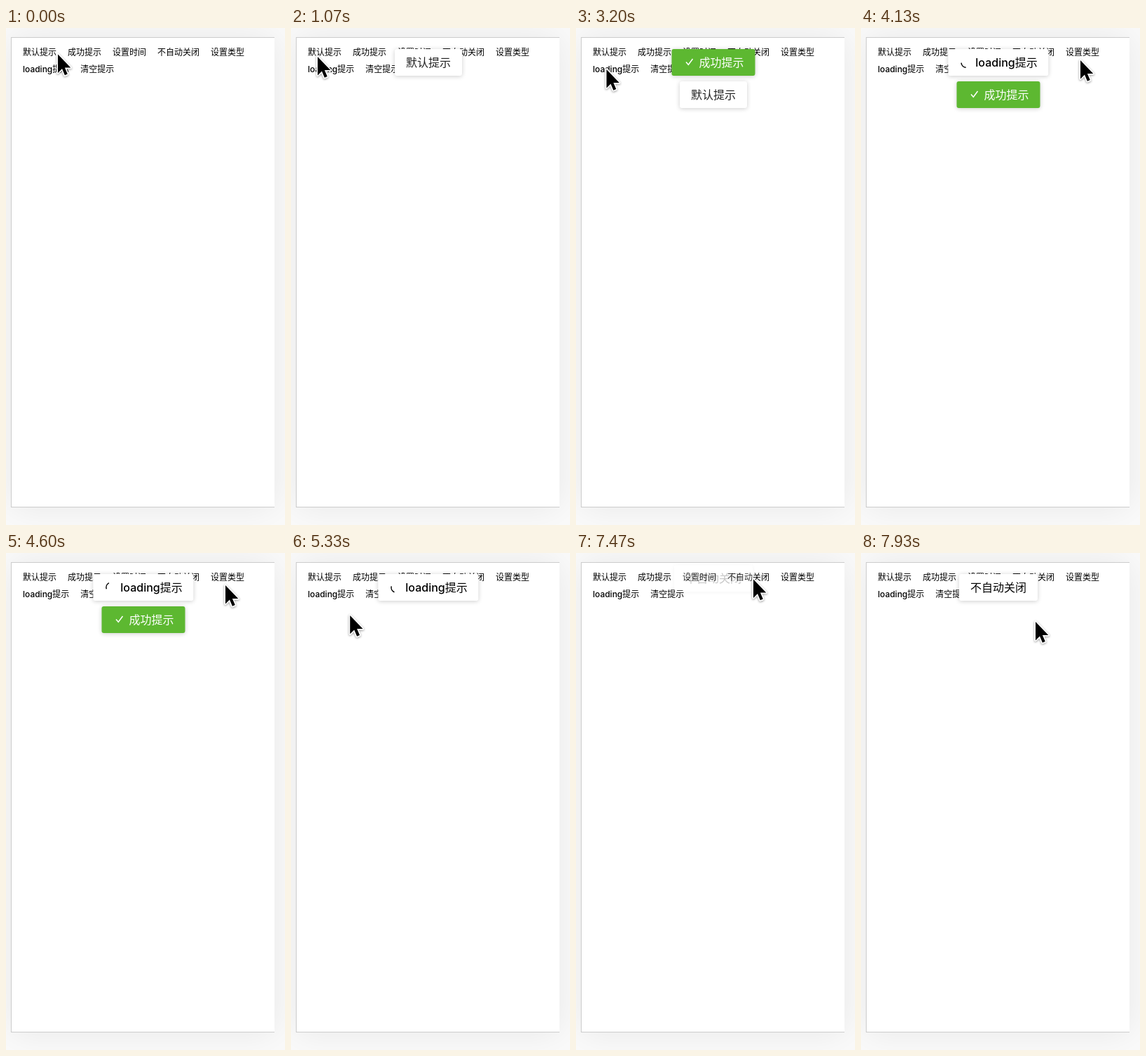
Animation, 398 px wide and 708 px high, one loop 8000 ms. Source, as an HTML page:

```html
<!DOCTYPE html>
<html lang="zh-CN">
<head>
<meta charset="utf-8">
<title>提示</title>
<style>
  html, body { margin: 0; width: 100%; height: 100%; overflow: hidden; }
  body {
    position: relative;
    background: #fafafa;
    color: #000;
    font: 500 12px/24px Inter, "Noto Sans CJK SC", "Noto Sans CJK", sans-serif;
    white-space: nowrap;
  }
  .panel {
    position: absolute;
    left: 7px; top: 13px; width: 376px; height: 670px;
    box-sizing: border-box;
    padding: 9px 16px;
    display: flex;
    flex-wrap: wrap;
    align-content: flex-start;
    column-gap: 16px;
    border: 1px solid #ccc;
    border-right: 0;
    background: #fff;
    box-shadow: 0 0 48px rgba(0, 0, 0, .08);
  }
  .toast {
    position: absolute;
    left: 196px; top: 0;
    display: flex;
    align-items: center;
    height: 38px;
    padding: 0 16px;
    border-radius: 3px;
    background: #fff;
    box-shadow: 0 1px 6px rgba(0, 0, 0, .2);
    font-size: 16px;
  }
  .toast svg {
    margin: 0 5px 0 2px;
    overflow: visible;
    fill: none;
    stroke: currentColor;
    stroke-width: 1.5;
  }
  .success { background: #5db831; color: #fff; }
  .plain { color: #222; }
  #cursor {
    position: absolute;
    left: 0; top: 0;
    overflow: visible;
    filter: drop-shadow(0 1px 1.5px rgba(0, 0, 0, .4));
  }
</style>
</head>
<body>
<div class="panel">
  <span>默认提示</span><span>成功提示</span><span>设置时间</span><span>不自动关闭</span>
  <span>设置类型</span><span>loading提示</span><span>清空提示</span>
</div>
<div class="toast plain">默认提示</div>
<div class="toast success">
  <svg width="16" height="16"><path d="M2.5 7.5L5.8 11.2L12 3"/></svg>成功提示
</div>
<div class="toast">
  <svg id="spinner" width="16" height="16"><path d="M13.6 3.3A7.3 7.3 0 0 1 13.6 12.7"/></svg>loading提示
</div>
<div class="toast">不自动关闭</div>
<svg id="cursor" width="20" height="32">
  <path d="M0 0V26.4L6 20.6L9.9 29.8L13.8 28.1L9.9 19.1H18.3Z"
        stroke="#fff" stroke-width="3.4" stroke-linejoin="round" paint-order="stroke"/>
</svg>
<script>
const LOOP = 8000, TICK = 1000 / 15;
const LIFE = 2920, FADE = 240, TOP = 30, PITCH = 46, RISE = 16;
const SPIN = .915; // degrees per ms

const cursor = document.getElementById('cursor');
const spinner = document.getElementById('spinner');

// Opening times, oldest first; the last toast stays open.
const opens = [430, 2120, 3370, 7440];
const toasts = [...document.querySelectorAll('.toast')].map((el, i) => ({
  el, from: opens[i], to: i < 3 ? opens[i] + LIFE : Infinity,
}));

// Pointer strokes: start, end, x, y
const home = [74, 37.5];
const moves = [
  [67, 200, 38, 41],
  [1200, 1733, 104, 37],
  [2270, 2930, 43.5, 59],
  [3330, 3800, 313, 46],
  [4600, 5270, 84, 89],
  [5333, 5930, 279, 37],
  [6300, 6500, 261, 37],
  [6667, 6800, 253, 37.5],
  [7530, 7933, 249, 98],
];

const clamp = v => Math.min(1, Math.max(0, v));
const easeOut = p => 1 - (1 - clamp(p)) ** 2;

function pointerAt(t) {
  let [x, y] = home;
  for (const [start, end, toX, toY] of moves) {
    const p = easeOut((t - start) / (end - start));
    x += (toX - x) * p;
    y += (toY - y) * p;
  }
  return [x, y];
}

function drawToast({ el, from, to }, i, t) {
  const shown = easeOut((t - from) / FADE) * (1 - easeOut((t - to) / FADE));
  const newer = toasts.slice(i + 1).filter(n => t >= n.from && t < n.to + FADE).length;
  const y = TOP + newer * PITCH - RISE * (1 - shown);
  el.style.opacity = shown;
  el.style.transform = `translate(-50%, ${y}px)`;
}

function draw(t) {
  toasts.forEach((toast, i) => drawToast(toast, i, t));
  spinner.style.transform = `rotate(${t * SPIN - 47}deg)`;
  const [x, y] = pointerAt(t);
  cursor.style.transform = `translate(${x}px, ${y}px)`;
}

const start = performance.now();
function frame() {
  const t = (performance.now() - start) % LOOP;
  draw(Math.floor((t + 5) / TICK) * TICK % LOOP);
  requestAnimationFrame(frame);
}
draw(0);
requestAnimationFrame(frame);
</script>
</body>
</html>
```
